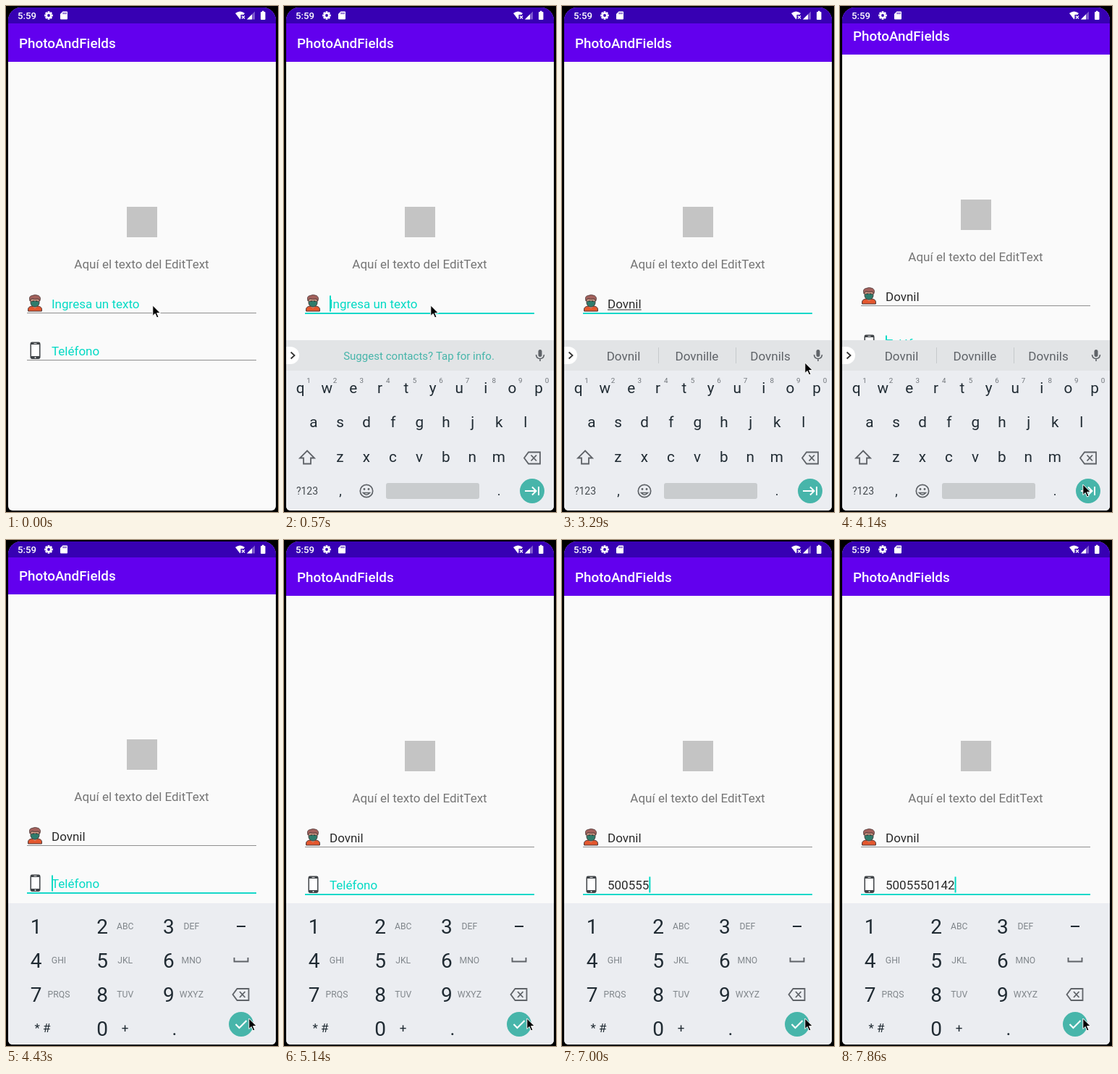
Animation of 376x698 px, one loop 8000 ms. Source, as an HTML page with a canvas:

```html
<!DOCTYPE html>
<html lang="es">
<head>
<meta charset="utf-8">
<title>Form demo</title>
<style>
html, body { margin: 0; width: 100%; height: 100%; overflow: hidden; background: #000; }
canvas { display: block; }
</style>
</head>
<body>
<canvas id="stage" width="376" height="698"></canvas>
<script>
const ctx = document.getElementById('stage').getContext('2d');
const LOOP = 8000;
const TEAL = '#03dac5', KEY_TEAL = '#47b5aa', INK = '#202b33', GREY = '#5f6368';
const NAME = 'Dovnil', PHONE = '5005550142';
const NAME_TIMES = [1710, 2000, 2290, 2430, 2570, 2710];
const PHONE_TIMES = [6000, 6290, 6430, 6570, 6860, 7000, 7290, 7570, 7710, 7860];
const SUGGESTIONS = {
  3: ['Dove', 'Dov', 'Doves'],
  4: ['Dove', 'Dovn', 'Doves'],
  5: ['Dovni', 'Dovnil', 'Done'],
  6: ['Dovnil', 'Dovnille', 'Dovnils']
};
const POINTER = [
  [0, 202, 413], [710, 202, 413], [860, 290, 417], [1000, 363, 419], [1140, 357, 421],
  [2860, 357, 421], [3000, 355, 438], [3140, 343, 474], [3290, 335, 492],
  [3430, 336, 538], [3570, 338, 600], [3710, 336, 648], [3860, 335, 660], [LOOP, 335, 660]
];

function text(str, x, y, size, color, align = 'left', weight = 400) {
  ctx.font = `${weight} ${size}px Roboto, sans-serif`;
  ctx.textAlign = align;
  ctx.fillStyle = color;
  ctx.fillText(str, x, y);
}
function rect(x, y, w, h, color, r = 0) {
  ctx.fillStyle = color;
  ctx.beginPath();
  ctx.roundRect(x, y, w, h, r);
  ctx.fill();
}
function disc(x, y, r, color) {
  ctx.fillStyle = color;
  ctx.beginPath();
  ctx.arc(x, y, r, 0, Math.PI * 2);
  ctx.fill();
}
function shape(d, x, y, fill, stroke, width = 1) {
  const path = new Path2D(d);
  ctx.save();
  ctx.translate(x, y);
  if (fill) { ctx.fillStyle = fill; ctx.fill(path); }
  if (stroke) { ctx.strokeStyle = stroke; ctx.lineWidth = width; ctx.stroke(path); }
  ctx.restore();
}

function statusBar() {
  rect(0, 0, 376, 24, '#3700b3');
  text('5:59', 16, 18, 13.2, '#fff', 'left', 500);
  ctx.save();
  ctx.translate(59, 13);
  ctx.fillStyle = '#fff';
  for (let i = 0; i < 8; i++) {
    ctx.rotate(Math.PI / 4);
    ctx.fillRect(-1.4, -5.8, 2.8, 3);
  }
  ctx.restore();
  disc(59, 13, 4.3, '#fff');
  disc(59, 13, 1.9, '#3700b3');
  shape('M3.5 0H9Q10 0 10 1V10Q10 11 9 11H1Q0 11 0 10V3.5Z', 75, 7.5, '#fff');
  for (let i = 0; i < 3; i++) rect(78.6 + i * 2, 9, 1, 2.2, '#3700b3');
  shape('M0 2.5Q6.5-2.5 13 2.5L6.5 11Z', 317, 7.5, '#fff');
  rect(324.5, 12, 7, 7, '#3700b3');
  shape('M0 0L4 4M4 0L0 4', 326, 13.5, null, '#fff', 1.3);
  shape('M11 0V11H0Z', 333, 7.5, 'rgba(255,255,255,.35)');
  shape('M7 4V11H0Z', 333, 7.5, '#fff');
  rect(352, 8, 6.5, 11, '#fff', 1);
  rect(354, 6.8, 2.5, 2, '#fff');
}

function avatar() {
  const line = '#4a3535';
  shape('M.6 23V20Q1 16.5 6 16H14Q19 16.5 19.4 20V23Z', 30, 398, '#e4572e', line);
  shape('M7 13H13V17L10 19L7 17Z', 30, 398, '#d99a83');
  shape('M4 6H16V10Q16 17 10 17Q4 17 4 10Z', 30, 398, '#dda28c', line, .8);
  shape('M3 9Q1 2 6 1.5Q10-.6 15 1.5Q19 4 16.7 9L15 6Q9 7 5.5 5.5Z', 30, 398, '#a3615c', line, .8);
  shape('M4.2 9.5Q10 7.8 15.8 9.5V13Q14 17 10 17Q6 17 4.2 13Z', 30, 398, '#2f7c6c', line, .6);
  disc(7.5 + 30, 407, .7, '#222');
  disc(12.5 + 30, 407, .7, '#222');
}

function handset() {
  rect(33.5, 463.5, 14, 23.5, '#3f4347', 2.4);
  rect(35, 467, 11, 16, '#fff');
  rect(38.5, 465, 4, .9, '#ddd');
  disc(40.5, 485, 1, '#eee');
}

function field(value, hint, y, focused, composing, caretOn) {
  if (focused) rect(29, y + 12, 317, 2, '#16d8c9');
  else rect(29, y + 12, 317, 1, '#8f8f8f');
  text(value || hint, 63, y + 6, 17, value ? '#2a2a2a' : TEAL);
  const w = value ? ctx.measureText(value).width : 0;
  if (composing) rect(63, y + 7.5, w, 1, '#2a2a2a');
  if (focused && caretOn) rect(63 + w, y - 11.5, 2, 22, TEAL);
}

function content(s) {
  rect(0, 0, 376, 698, '#fafafa');
  ctx.save();
  ctx.translate(0, s.pan);
  rect(0, 0, 376, 77, '#6200ee');
  text('PhotoAndFields', 18, 57.5, 18.85, '#fff', 'left', 500);
  rect(167, 277, 42, 42, '#c4c4c4');
  text('Aquí el texto del EditText', 187.5, 362, 17, '#757575', 'center');
  field(s.name, 'Ingresa un texto', 411, s.focus === 1, s.focus === 1 && s.name, s.caret);
  avatar();
  field(s.phone, 'Teléfono', 476, s.focus === 2, false, s.caret);
  handset();
  ctx.restore();
}

function backspace(x, y) {
  shape('M-5-8H11V8H-5L-11 0Z', x, y, null, GREY, 1.8);
  shape('M-1.5-4L6 4M6-4L-1.5 4', x, y, null, GREY, 1.8);
}

function suggestionStrip(words) {
  rect(0, 461, 376, 42, '#e2e4e6');
  rect(-10, 470, 31, 24, '#fff', 12);
  shape('M-2.5-4.5L2.5 0L-2.5 4.5', 12, 482, null, '#333', 1.8);
  if (words) {
    words.forEach((word, i) => text(word, 85 + i * 101.5, 489, 17, GREY, 'center'));
    rect(133, 471, 1, 22, '#c6c9cc');
    rect(240, 471, 1, 22, '#c6c9cc');
  } else {
    text('Suggest contacts? Tap for info.', 186.5, 488, 15.05, KEY_TEAL, 'center');
  }
  rect(351.5, 474, 5, 10, GREY, 2.5);
  shape('M-5.5-1Q-5 4.5 0 4.5Q5 4.5 5.5-1M0 4.5V8', 354, 482, null, GREY, 1.6);
}

function letterKeys(words) {
  rect(0, 461, 376, 237, '#ebedf1');
  suggestionStrip(words);
  const row = (keys, x, y) =>
    [...keys].forEach((k, i) => text(k, x + i * 36.6, y, 20.7, INK, 'center'));
  row('qwertyuiop', 22.6, 534);
  row('asdfghjkl', 41, 581);
  row('zxcvbnm', 77.3, 629);
  [...'1234567890'].forEach((k, i) => text(k, 34 + i * 36.6, 519.5, 9.8, '#70757a', 'center'));
  shape('M0-9.5L10 .5H5V8.5H-5V.5H-10Z', 32, 623, null, GREY, 1.8);
  backspace(343, 623.5);
  text('?123', 32, 674, 14, '#454b50', 'center');
  text(',', 78, 675, 18, INK, 'center');
  shape('M8.7 0A8.7 8.7 0 1 1-8.7 0A8.7 8.7 0 1 1 8.7 0M-4.5 2.5Q0 8 4.5 2.5Z', 114, 669, null, GREY, 1.7);
  disc(111, 666.5, 1.4, GREY);
  disc(117, 666.5, 1.4, GREY);
  rect(141, 658, 129, 22, '#c9ccce', 3);
  text('.', 297, 675, 18, INK, 'center');
  disc(343, 669, 17, KEY_TEAL);
  shape('M-10 0H5M0-5.5L5.5 0L0 5.5M9-6V6', 343, 669, null, '#fff', 2);
}

function numberKeys() {
  rect(0, 501, 376, 197, '#ebedf1');
  const captions = ['', 'ABC', 'DEF', 'GHI', 'JKL', 'MNO', 'PRQS', 'TUV', 'WXYZ'];
  captions.forEach((caption, i) => {
    const x = 41.5 + (i % 3) * 91.7, y = 543 + Math.floor(i / 3) * 47;
    text(i + 1, x, y, 28, INK, 'center');
    text(caption, x + 31.5, y - 6, 12.2, '#80868b', 'center');
  });
  text('0', 133.2, 684, 28, INK, 'center');
  text('* #', 50.5, 679, 17, INK, 'center');
  text('+', 164.5, 679, 17, INK, 'center');
  text('.', 233, 683, 26, INK, 'center');
  rect(319, 532, 12, 2, INK);
  shape('M-9.5-3V2.5H9.5V-3', 325, 579, null, GREY, 1.9);
  backspace(324.5, 627);
  disc(325, 668, 17, KEY_TEAL);
  shape('M-7.5 0L-2.5 5L7.5-5', 325, 668, null, '#fff', 2.1);
}

function pointer(t) {
  const i = POINTER.findIndex(p => p[0] > t);
  const [t0, x0, y0] = POINTER[i - 1], [t1, x1, y1] = POINTER[i];
  const k = (t - t0) / (t1 - t0);
  shape('M0 0V14.5L3.4 11.4L5.8 17L8.2 16L5.8 10.6H10.5Z',
    x0 + (x1 - x0) * k + .8, y0 + (y1 - y0) * k, '#000', '#fff', 1);
}

function stateAt(t) {
  const typed = times => times.filter(at => at <= t).length;
  const resets = [140, 4290, ...NAME_TIMES, ...PHONE_TIMES].filter(at => at <= t);
  const name = NAME.slice(0, typed(NAME_TIMES));
  return {
    name,
    phone: PHONE.slice(0, typed(PHONE_TIMES)),
    focus: t < 140 ? 0 : t < 4140 ? 1 : 2,
    caret: (t - Math.max(0, ...resets)) % 1000 < 500,
    pan: t < 4140 || t >= 4570 ? 0 : t < 4290 ? -10 : t < 4430 ? -14 : -2,
    slide: t < 280 ? 160 : t < 430 ? 36 : 0,
    words: SUGGESTIONS[name.length]
  };
}

// The screen refreshes seven times a second, on a 10 ms clock.
function snap(t) {
  const at = n => Math.round(n * 100 / 7) * 10;
  const n = Math.floor(t * 7 / 1000);
  return at(n + 1) <= t ? at(n + 1) : Math.min(at(n), t);
}

function draw(now) {
  const t = snap(now % LOOP), s = stateAt(t);
  ctx.fillStyle = '#000';
  ctx.fillRect(0, 0, 376, 698);
  ctx.save();
  ctx.beginPath();
  ctx.roundRect(3, 2, 370, 694, [18, 18, 6, 6]);
  ctx.clip();
  content(s);
  statusBar();
  if (s.focus) {
    ctx.save();
    ctx.translate(0, s.slide);
    if (t < 4290) letterKeys(s.words);
    else numberKeys();
    ctx.restore();
  }
  ctx.restore();
  pointer(t);
}

let start;
function tick(now) {
  start ??= now;
  draw(Math.max(0, now - start));
  requestAnimationFrame(tick);
}
requestAnimationFrame(tick);
</script>
</body>
</html>
```
